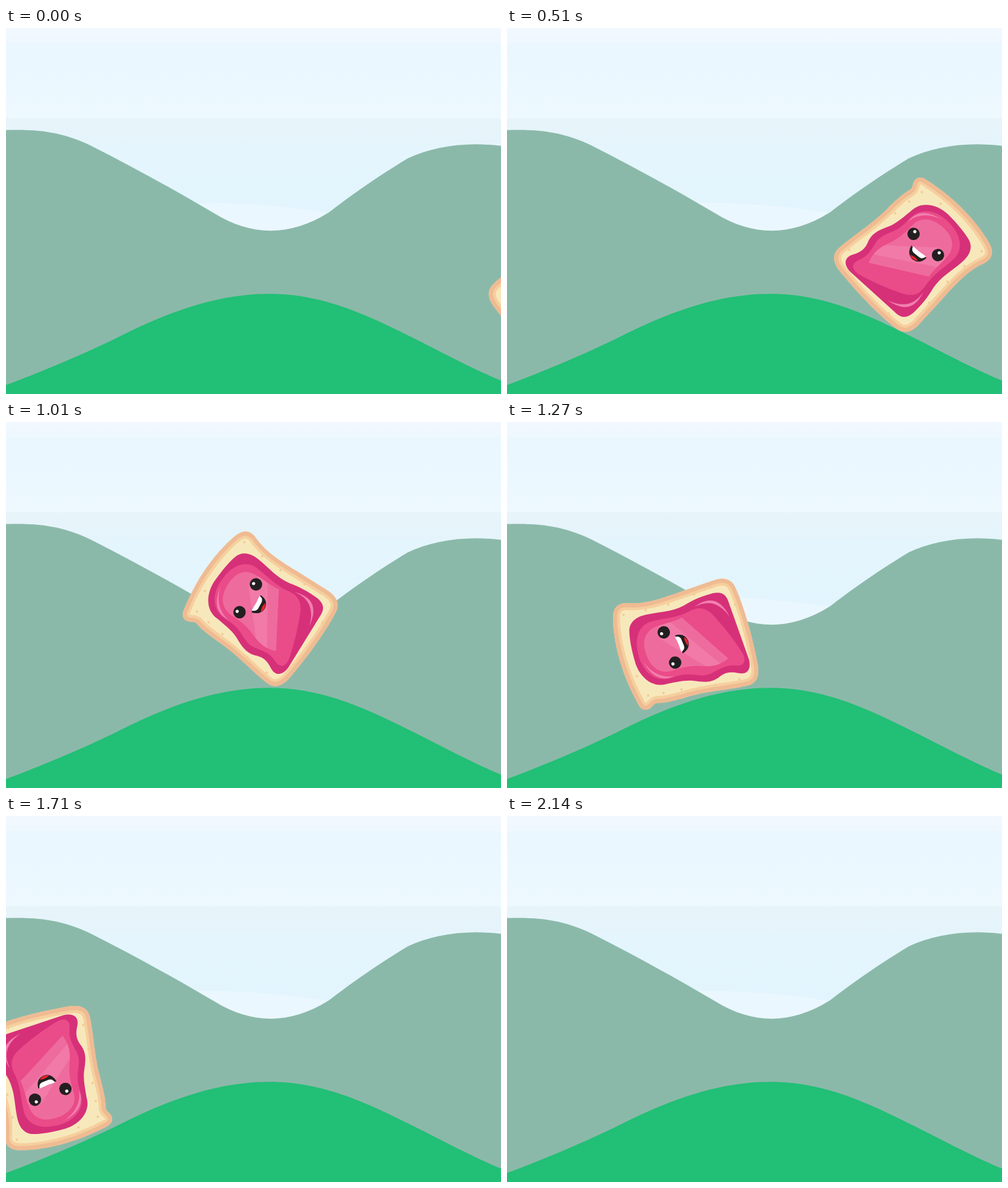
An HTML page for the animation above (2210 ms loop, 784x580 px).

```html
<!DOCTYPE html>
<html lang="en">
<head>
<meta charset="utf-8">
<title>Rolling toast</title>
<style>
  html, body { margin: 0; width: 100%; height: 100%; overflow: hidden; background: #e9f7fe; }
  svg { display: block; }
</style>
</head>
<body>
<svg width="784" height="580" viewBox="0 0 784 580">
  <defs>
    <linearGradient id="sky" gradientUnits="userSpaceOnUse" x1="0" y1="0" x2="0" y2="330">
      <stop offset="0" stop-color="#f2f8ff"/>
      <stop offset=".073" stop-color="#eff8ff"/>
      <stop offset=".073" stop-color="#eaf7fe"/>
      <stop offset=".433" stop-color="#edf8ff"/>
      <stop offset=".433" stop-color="#e7f4fa"/>
      <stop offset=".56" stop-color="#e5f4fb"/>
      <stop offset=".57" stop-color="#e4f5fd"/>
      <stop offset="1" stop-color="#e2f4fd"/>
    </linearGradient>
    <path id="slice" d="M488 238C488 230 494 226 503 226C520 225 535 225 550 226C590 229 625 239 645 249C658 256 660 266 655 277C641 301 638 330 635 362L629 419C626 437 617 444 604 444C570 443 525 436 478 424C460 419 453 409 455 397C460 370 475 335 480 298C484 275 486 265 491 254C493 248 488 245 488 238Z"/>
    <clipPath id="inside"><use href="#slice"/></clipPath>
  </defs>

  <rect width="784" height="580" fill="url(#sky)"/>
  <path d="M290 278Q400 274 530 296V340H290Z" fill="#ebf7fe"/>
  <g transform="translate(0 .7)">
    <path fill="#8bb9a9" d="M0 161C60 159 95 167 133 185C200 219 262 253 330 293C390 330 450 330 512 291C545 266 580 240 636 206C675 188 725 179 784 186V580H0Z"/>
    <path id="hill" fill="#22bf76" d="M-220 650C-140 620 -70 591 0 565C60 543 120 517 170 493C252 451 332 420.5 418 420.5C500 420.5 570 453 640 488C690 513 740 540 784 558C815 570 850 575 1040 576V700H-220Z"/>
  </g>

  <g id="toast">
    <g clip-path="url(#inside)">
      <use href="#slice" fill="#f7e8bb" stroke="#f6cf9e" stroke-width="22"/>
      <use href="#slice" fill="none" stroke="#efbb93" stroke-width="13"/>
    </g>
    <g id="crumbs" fill="#f1cc96"></g>
    <!-- jam -->
    <path fill="#d63079" d="M512 281C515 257 540 247 562 249.500C585 253 600 257 612 262C626 268 629 282 625 298C620 320 612 335 613 358C615 375 614 392 611 408C607 424 598 426 585 424L492 415C476 412 471 402 479 391C487 380 490 372 486 358C484 342 491 333 499 320C506 308 508 295 512 281Z"/>
    <path fill="#ea4b89" d="M518 290C522 262 550 254 575 260C600 265 615 280 612 300C608 322 600 340 601 360C602 378 596 388 578 394C552 402 525 408 505 410C490 411 486 402 492 392C500 378 498 368 497 352C497 338 505 330 511 318C516 308 516 300 518 290Z"/>
    <path fill="#ee6c9d" d="M527 298C530 276 548 269 568 271C592 273 604 287 601 307C600 322 596 335 597 347L507 386C503 372 506 358 512 346C522 330 525 315 527 298Z"/>
    <path fill="#f17aa8" d="M511 349L580 302L601 309L598 327L505 371Q506 359 511 349Z"/>
    <path fill="#f27fae" d="M518 297Q519 264 560 262Q526 268 518 297ZM604 372Q613 415 566 416Q606 409 604 372Z"/>
    <!-- face -->
    <g fill="#231f20">
      <circle cx="537" cy="307" r="9.800"/>
      <circle cx="588" cy="311" r="9.800"/>
      <path d="M545 324Q560 327 576 325Q574 340 560 340.500Q547 339 545 324Z"/>
    </g>
    <g fill="#fff">
      <circle cx="536.500" cy="303" r="2.500"/>
      <circle cx="587.500" cy="307" r="2.500"/>
      <path d="M548 323Q561 325 574 324Q573 331 567 331.500L555 331Q549 330 548 323Z"/>
    </g>
    <path fill="#e4232c" d="M552 337Q560 334 568 337Q560 343 552 337Z"/>
  </g>
</svg>
<script>
const LOOP = 2210, STEPS = 35;
const CX = 556, CY = 336;   // pivot of the toast as drawn
const $ = id => document.getElementById(id);

// step, centre x, rotation in degrees
const KEYS = [
  [0, 882, 136], [8, 642, 36.5], [11, 556, 0], [16, 404.3, -63.9],
  [20, 284.5, -115.1], [27, 65, -204], [34, -152, -293]
];

const CRUMBS = [
  [508, 246], [543, 243], [501, 270], [494, 298], [483, 322], [478, 350],
  [470, 388], [640, 265], [632, 300], [625, 336], [622, 380], [500, 421],
  [580, 432], [621, 408]
];
for (const [cx, cy] of CRUMBS) {
  const dot = document.createElementNS('http://www.w3.org/2000/svg', 'circle');
  dot.setAttribute('cx', cx);
  dot.setAttribute('cy', cy);
  dot.setAttribute('r', 1.9);
  $('crumbs').append(dot);
}

// ground height for every whole x
const ground = {};
for (let s = 0, p; (p = $('hill').getPointAtLength(s)).x < 1035; s += 0.5)
  ground[Math.round(p.x)] = p.y;

const rim = [];
const rimLength = $('slice').getTotalLength();
for (let s = 0; s < rimLength; s += 4) {
  const p = $('slice').getPointAtLength(s);
  rim.push([p.x - CX, p.y - CY]);
}

// centre height at which the turned slice just touches the hill
function restingY(x, deg) {
  const a = deg * Math.PI / 180, c = Math.cos(a), s = Math.sin(a);
  let y = Infinity;
  for (const [dx, dy] of rim) {
    const g = ground[Math.round(x + dx * c - dy * s)];
    if (g !== undefined) y = Math.min(y, g - (dx * s + dy * c));
  }
  return y;
}

function pose(step) {
  const n = Math.max(1, KEYS.findIndex(k => k[0] >= step));
  const [i0, x0, a0] = KEYS[n - 1], [i1, x1, a1] = KEYS[n];
  const u = (step - i0) / (i1 - i0);
  const x = x0 + (x1 - x0) * u, deg = a0 + (a1 - a0) * u;
  const lift = 0.3 * step - 2.8;
  return [x, restingY(x, deg) - lift, deg];
}

const start = performance.now();
function draw() {
  const t = Math.max(0, performance.now() - start) % LOOP;
  const step = Math.min(STEPS - 1, Math.floor((t + 7.5) * STEPS / LOOP));
  const [x, y, deg] = pose(step);
  $('toast').setAttribute('transform',
    `translate(${x} ${y}) rotate(${deg}) translate(${-CX} ${-CY})`);
  requestAnimationFrame(draw);
}
draw();
</script>
</body>
</html>
```
